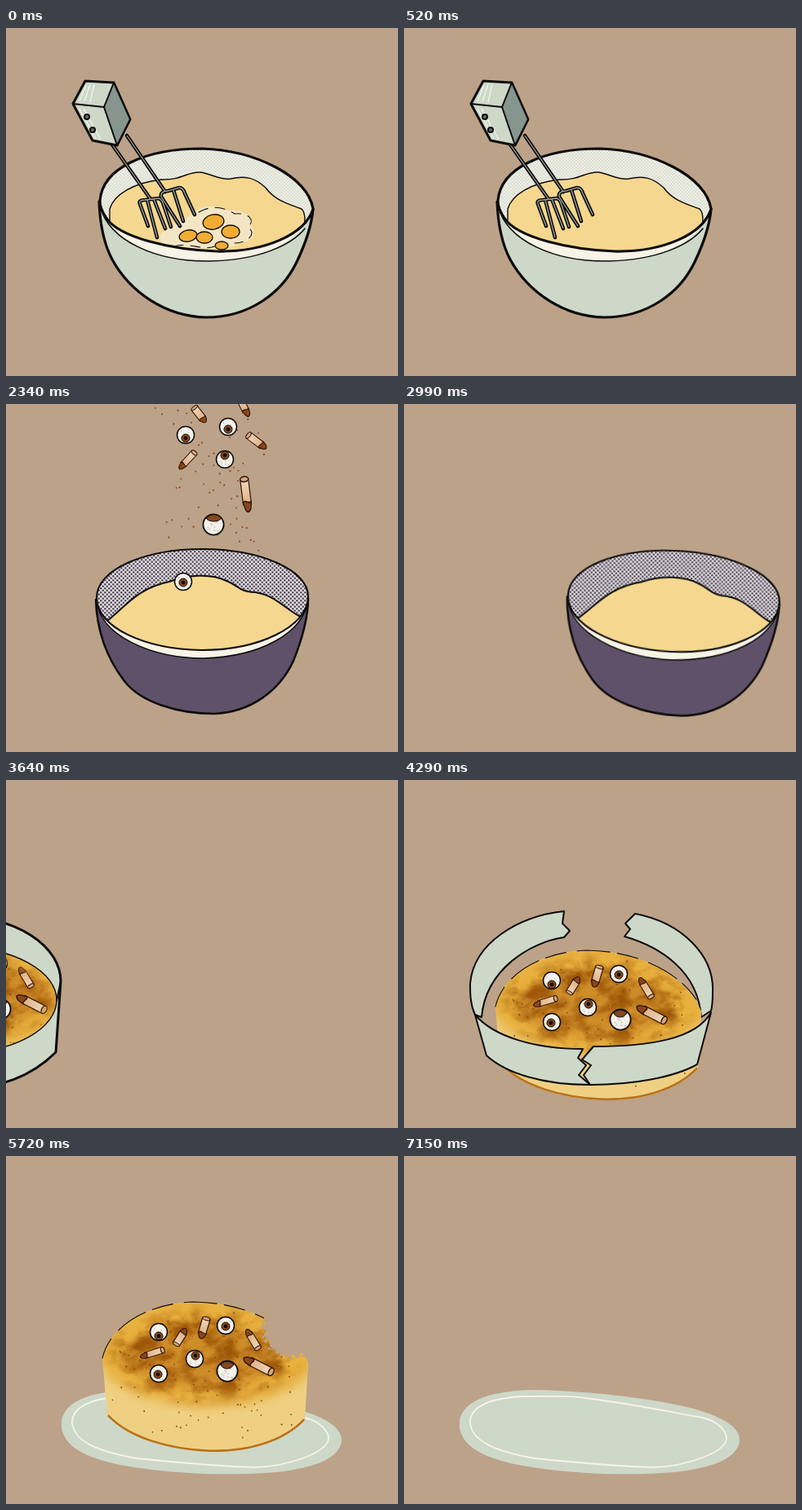
An HTML page without scripts that plays this animation: 480x427 px, repeating every 7410 ms.

```html
<!DOCTYPE html>
<html lang="en">
<head>
<meta charset="utf-8">
<title>Spooky cake</title>
<style>
html, body { margin: 0; height: 100%; overflow: hidden; background: #bca288; }
svg { display: block; width: 100vw; height: 100vh; }

/* The loop is 57 ticks of 130 ms; one tick is 1.7544 %. */
.mixing, .mixer, .eggs, .bowl, .stream, .batter, .toppings, .tin, .left, .right, .cake, .plate {
  animation: 7410ms step-end -2ms infinite;
}
.mixing { animation-name: mixing; }
.mixer { animation-name: mixer; transform-origin: 185px 235px; }
.eggs { animation-name: eggs; transform-origin: 245px 250px; }
.bowl { animation-name: bowl; transform-origin: 240px 280px; }
.stream { animation-name: stream; }
.batter { animation-name: batter; }
.toppings { animation-name: toppings; }
.tin { animation-name: tin; }
.left { animation-name: left; transform-origin: 225px 373px; }
.right { animation-name: right; transform-origin: 225px 373px; }
.cake { animation-name: cake; }
.plate { animation-name: plate; }
.bites circle { animation: bite 7410ms step-end calc(var(--tick) * 130ms - 7412ms) infinite; }

@keyframes mixing {
  0% { transform: none; }
  8.772% { transform: translateY(150px); }
  10.526% { transform: translateY(400px); }
}
@keyframes mixer {
  0% { transform: none; }
  1.754% { transform: translate(24px, -26px) rotate(4deg); }
  3.509% { transform: translate(58px, -8px) rotate(8deg); }
  5.263% { transform: translate(30px, 4px) rotate(3deg); }
  7.018% { transform: none; }
}
@keyframes eggs {
  0% { transform: none; animation-timing-function: steps(4); }
  7.018% { transform: rotate(120deg) scale(0); }
  100% { transform: rotate(120deg) scale(0); }
}
@keyframes bowl {
  0% { transform: translateY(270px); }
  10.526% { transform: translateY(270px); animation-timing-function: steps(2); }
  14.035% { transform: none; }
  38.596% { transform: none; animation-timing-function: steps(5); }
  47.368% { transform: translate(440px, 10px) rotate(12deg); }
  100% { transform: translate(440px, 10px) rotate(12deg); }
}
@keyframes stream {
  0% { transform: translateY(-320px); }
  12.281% { transform: translateY(-320px); animation-timing-function: steps(2); }
  15.789% { transform: none; animation-timing-function: steps(3); }
  21.053% { transform: translateY(90px); animation-timing-function: steps(2); }
  24.561% { transform: translateY(600px); }
  100% { transform: translateY(600px); }
}
@keyframes batter {
  0% { transform: translateY(100px); }
  15.789% { transform: translateY(100px); animation-timing-function: steps(5); }
  24.561% { transform: none; }
  100% { transform: none; }
}
@keyframes toppings {
  0% { transform: translateY(-280px); }
  24.561% { transform: translateY(-280px); animation-timing-function: steps(8); }
  38.596% { transform: translateY(280px); }
  100% { transform: translateY(280px); }
}
@keyframes tin {
  0% { transform: translate(-544px, -13px); }
  45.614% { transform: translate(-544px, -13px); animation-timing-function: steps(2); }
  49.123% { transform: translate(-272px, -13px); animation-timing-function: steps(2); }
  52.632% { transform: none; }
  54.386% { transform: translateY(-8px); }
  56.14% { transform: translateY(900px); }
}
@keyframes left {
  0% { transform: translateX(-900px); }
  56.14% { transform: rotate(6deg); }
  57.895% { transform: none; }
  59.649% { transform: translate(-90px, 12px) rotate(-10deg); }
  61.404% { transform: translate(-210px, 24px) rotate(-22deg); }
  63.158% { transform: translateX(-900px); }
}
@keyframes right {
  0% { transform: translateX(900px); }
  56.14% { transform: rotate(-6deg); }
  57.895% { transform: none; }
  59.649% { transform: translate(90px, 12px) rotate(10deg); }
  61.404% { transform: translate(210px, 24px) rotate(22deg); }
  63.158% { transform: translateX(900px); }
}
@keyframes cake {
  0% { transform: translateY(-900px); }
  56.14% { transform: translate(-6px, 30px); }
  64.912% { transform: translateY(-80px); }
  66.667% { transform: translateY(-160px); }
  68.421% { transform: translateY(-150px); }
  70.175% { transform: translateY(-70px); }
  71.93% { transform: none; }
  96.491% { transform: translateY(-900px); }
}
@keyframes plate {
  0% { transform: translateX(500px); }
  63.158% { transform: translateX(500px); animation-timing-function: steps(4); }
  70.175% { transform: none; }
  100% { transform: none; }
}
@keyframes bite {
  0% { opacity: 1; }
  35% { opacity: 0; }
}

.ink { stroke: #0d0b0a; stroke-linejoin: round; stroke-linecap: round; }
.line { fill: none; }
.mint { fill: #cdd8c9; }
.cream { fill: #f7f3e6; }
.dough { fill: #f5d78f; }
.yolk { fill: #f1ac33; stroke-width: 1.3; }
.specks { fill: none; stroke: #8a4a1c; stroke-width: 2; stroke-dasharray: 1.6 17 2 26 1.5 11; }
</style>
</head>
<body>
<svg viewBox="0 0 480 427" preserveAspectRatio="none">
<defs>
  <pattern id="mintDots" width="4" height="4" patternUnits="userSpaceOnUse">
    <path d="M0 0H4V4H0z" fill="#eeeee4"/>
    <g fill="#bcc9bc"><circle cx="1" cy="1" r=".7"/><circle cx="3" cy="3" r=".7"/></g>
  </pattern>
  <pattern id="plumDots" width="5" height="5" patternUnits="userSpaceOnUse">
    <path d="M0 0H5V5H0z" fill="#dfdad8"/>
    <g fill="#4c445c"><circle cx="1.25" cy="1.25" r="1.2"/><circle cx="3.75" cy="3.75" r="1.2"/></g>
  </pattern>
  <linearGradient id="skin">
    <stop stop-color="#f0d8bc"/><stop offset="1" stop-color="#e0ae84"/>
  </linearGradient>

  <filter id="soft" x="-20%" y="-30%" width="140%" height="160%"><feGaussianBlur stdDeviation="7"/></filter>
  <filter id="scorch" x="-20%" y="-30%" width="140%" height="160%" color-interpolation-filters="sRGB">
    <feTurbulence type="fractalNoise" baseFrequency=".035 .05" numOctaves="5" seed="4"/>
    <feColorMatrix values="0 0 0 0 .62  0 0 0 0 .34  0 0 0 0 .03  3 0 0 0 -1.1" result="spots"/>
    <feGaussianBlur in="SourceAlpha" stdDeviation="9"/>
    <feComposite in="spots" operator="in"/>
  </filter>
  <filter id="ragged" x="-20%" y="-20%" width="140%" height="140%">
    <feTurbulence type="fractalNoise" baseFrequency=".25" numOctaves="2" seed="7"/>
    <feDisplacementMap in="SourceGraphic" scale="18" xChannelSelector="R" yChannelSelector="G"/>
  </filter>

  <clipPath id="mintMouth"><path id="mintRim" d="M115 212C118 172 170 148 240 148C305 150 370 182 376 222C366 254 316 275 258 274C205 272 138 258 122 232C118 226 115 220 115 212z"/></clipPath>
  <clipPath id="plumMouth"><path id="plumRim" d="M111 238C111 202 172 178 240 178C312 178 370 204 370 236C370 274 308 302 240 302C170 301 111 274 111 238z"/></clipPath>
  <clipPath id="pourArea"><path d="M0-10H480V236H370C370 274 308 302 240 302C170 301 111 274 111 238H0z"/></clipPath>
  <clipPath id="aboveBatter"><path d="M0-10H480V238H0z"/></clipPath>
  <clipPath id="tinMouth"><ellipse cx="214" cy="283" rx="120" ry="65"/></clipPath>
  <clipPath id="cakeShape"><path d="M118 248C128 205 180 180 230 179C300 180 352 212 370 254L366 324C340 352 295 364 250 363C200 361 150 347 124 319z"/></clipPath>

  <g id="ball" class="ink" stroke-width="1.5">
    <circle r="10.5" fill="#f4f1ea"/>
    <path class="specks" d="M-6-5L5 7L-7 4L6-4" style="stroke:#c3b9ae;stroke-width:1;stroke-dasharray:1 4"/>
  </g>
  <g id="iris"><circle r="5" fill="#85481d" stroke="#1a0f08"/><circle r="2.4" fill="#120b07"/></g>
  <g id="finger" stroke="#2a160c" stroke-width="1.2">
    <path d="M-14-5H9V5H-14z" fill="url(#skin)"/>
    <ellipse cx="-14" rx="2.4" ry="5" fill="#d9a57c"/>
    <path d="M7-5C11-4 15-5 16 0C15 4 12 3 7 5C4 2 9-1 7-5z" fill="#8a451a"/>
  </g>

  <g id="cakeFace">
    <path d="M100 160H390V380H100z" fill="#efd083"/>
    <path d="M110 244C128 200 180 172 230 171C305 172 365 210 380 252C366 288 300 308 245 307C180 305 125 288 110 244z" fill="#e8b03c" filter="url(#soft)"/>
    <ellipse cx="240" cy="247" rx="94" ry="38" fill="#b56a12" opacity=".5" filter="url(#soft)"/>
    <ellipse cx="242" cy="244" rx="112" ry="52" filter="url(#scorch)"/>
    <path class="specks" d="M130 300L200 200L215 345L280 190L290 350L345 230L350 335L140 240L180 340L320 300" style="stroke:#7d4c14;stroke-width:1.6"/>
  </g>
  <g id="cakeItems">
    <use href="#ball" x="187" y="216"/><use href="#iris" x="187" y="221"/>
    <use href="#ball" x="269" y="208"/><use href="#iris" x="269" y="209"/>
    <use href="#ball" x="231" y="249"/><use href="#iris" x="232" y="245"/>
    <use href="#ball" x="187" y="267"/><use href="#iris" x="186" y="268"/>
    <use href="#ball" transform="translate(271 264) scale(1.2)"/>
    <path class="ink" d="M263 256Q271 248 279 256Q276 261 271 261Q265 261 263 256z" fill="#85481d"/>
    <use href="#finger" transform="translate(214 222) rotate(-58) scale(.75 .9)"/>
    <use href="#finger" transform="translate(242 211) rotate(106) scale(.85 .95)"/>
    <use href="#finger" transform="translate(302 225) rotate(-121) scale(.9 .85)"/>
    <use href="#finger" transform="translate(179 242) rotate(163) scale(.95 .75)"/>
    <use href="#finger" transform="translate(309 257) rotate(207) scale(1.25 1)"/>
  </g>
  <path id="whisk" d="M130 143L177 210M148 132L195 201M174 243L164 216Q162 211 170 211L187 209Q191 210 193 217L202 244M173 211L185 257M181 210L195 246M213 243L190 207Q189 200 198 200L212 196Q217 196 219 203L231 229M205 199L217 237"/>

  <mask id="eaten" maskUnits="userSpaceOnUse" x="0" y="0" width="480" height="427">
    <path d="M0 0H480V427H0z" fill="#fff"/>
    <g class="bites" filter="url(#ragged)">
      <circle cx="351" cy="211" r="36" style="--tick:44"/>
      <circle cx="308" cy="205" r="38" style="--tick:45"/>
      <circle cx="345" cy="262" r="42" style="--tick:46"/>
      <circle cx="292" cy="258" r="44" style="--tick:47"/>
      <circle cx="250" cy="208" r="44" style="--tick:48"/>
      <circle cx="240" cy="266" r="46" style="--tick:49"/>
      <circle cx="345" cy="322" r="50" style="--tick:50"/>
      <circle cx="285" cy="335" r="50" style="--tick:51"/>
      <circle cx="180" cy="212" r="46" style="--tick:52"/>
      <circle cx="220" cy="335" r="52" style="--tick:53"/>
      <circle cx="150" cy="262" r="48" style="--tick:54"/>
    </g>
  </mask>
</defs>

<path d="M0 0H480V427H0z" fill="#bca288"/>

<g class="plate">
  <path class="mint" d="M68 332C66 305 95 288 160 287C230 288 330 300 370 315C400 325 412 338 411 350C408 370 380 383 330 388C270 393 200 390 140 379C95 370 70 355 68 332z"/>
  <path class="line" stroke="#f8f4e6" stroke-width="1.8" d="M81 328C80 308 105 296 150 295C200 295 200 294 230 298C290 306 330 315 365 321C385 325 395 338 395 347C393 364 345 381 305 382C260 381 210 376 160 371C110 362 84 350 81 328z"/>
</g>

<g class="mixing">
  <path class="ink mint" stroke-width="3.2" d="M114 213C115 240 120 265 130 284C152 324 195 354 245 355C298 355 338 325 356 287C366 266 374 245 376 222z"/>
  <path class="cream" d="M115 208C115 250 170 287 250 286C310 286 365 262 376 222z"/>
  <path class="ink line" stroke-width="1.5" d="M115 218C126 262 185 287 250 286C310 285 350 266 366 246"/>
  <g clip-path="url(#mintMouth)">
    <path d="M100 140H390V290H100z" fill="url(#mintDots)"/>
    <path class="ink dough" stroke-width="1.4" d="M127 300V222C132 205 155 190 190 186C215 187 222 176 238 177C252 179 262 187 275 185C292 181 304 183 318 196C330 213 350 217 362 222C367 227 367 236 364 250V300z"/>
  </g>
  <g class="eggs">
    <path fill="#f4e6c4" d="M190 262C180 250 215 240 225 230C240 215 262 217 272 224C290 222 306 232 300 242C310 256 296 264 284 264C270 276 240 270 228 270C212 272 192 272 190 262z"/>
    <path class="ink line" stroke-width="1.1" stroke-dasharray="12 9" d="M205 268C225 262 240 274 255 268M236 226C255 215 270 222 280 228C300 226 305 238 296 244C308 252 296 264 280 264"/>
    <g class="ink yolk">
      <ellipse cx="254" cy="238" rx="13" ry="9" transform="rotate(-12 254 238)"/>
      <ellipse cx="275" cy="250" rx="11" ry="8"/>
      <ellipse cx="223" cy="255" rx="11" ry="7" transform="rotate(-12 223 255)"/>
      <ellipse cx="243" cy="257" rx="10" ry="7"/>
      <ellipse cx="264" cy="267" rx="8" ry="5"/>
    </g>
  </g>
  <use href="#mintRim" class="ink line" stroke-width="3.2"/>
  <g class="mixer">
    <use href="#whisk" class="ink line" stroke-width="4.6"/>
    <use href="#whisk" class="line" stroke="#9ba69f" stroke-width="1.3"/>
    <path class="ink mint" stroke-width="3" d="M97 65L132 67L152 112L136 144L106 138L82 93z"/>
    <path class="ink" stroke-width="2" fill="#87958f" d="M132 67L152 112L136 144L120 97z"/>
    <path class="ink line" stroke-width="2" d="M82 93L120 97"/>
    <path class="line" stroke="#f4f4ea" stroke-width="1.3" d="M98 70L90 90M103 69L96 90M108 69L103 91M90 99L110 136M95 99L116 137"/>
    <g class="ink" fill="#65706b" stroke-width="2"><circle cx="99" cy="109" r="3"/><circle cx="106" cy="125" r="3"/></g>
  </g>
</g>

<g class="bowl">
  <path class="ink" fill="#5e5169" stroke-width="2.5" d="M110 240C111 275 122 310 145 340C165 366 210 380 255 380C300 378 335 352 352 315C362 290 370 265 370 238z"/>
  <path class="ink cream" stroke-width="1.6" d="M111 240C114 285 180 312 242 312C310 310 366 282 370 238z"/>
  <use href="#plumRim" fill="url(#plumDots)"/>
  <g clip-path="url(#pourArea)">
    <path class="stream ink dough" stroke-width="2.5" d="M182 0C182 40 206 50 203 95C201 120 222 130 220 178C215 200 198 220 199 245C202 270 228 290 247 291C262 290 276 265 274 247C270 220 260 205 261 178C262 150 269 120 267 78C275 55 300 35 303 0C305-90 270-180 245-250C215-180 186-90 182 0z"/>
  </g>
  <g clip-path="url(#plumMouth)">
    <path class="batter ink dough" stroke-width="2" d="M124 266C145 250 160 226 200 218C220 210 250 207 270 217C285 223 285 230 305 231C328 234 340 250 362 262V420H124z"/>
  </g>
  <use href="#plumRim" class="ink line" stroke-width="2.2"/>
</g>

<g clip-path="url(#aboveBatter)">
  <g class="toppings">
    <path class="specks" d="M230 10L182 5L236 50L205 110L300 15L320 60L240 95L290 170L196 140L200 168L285 70L282 140L312 185L215 0"/>
    <use href="#ball" x="220" y="38"/><use href="#iris" x="220" y="42"/>
    <use href="#ball" x="272" y="28"/><use href="#iris" x="272" y="31"/>
    <use href="#ball" x="268" y="68"/><use href="#iris" x="268" y="63"/>
    <use href="#ball" x="217" y="218"/><use href="#iris" x="217" y="219"/>
    <use href="#ball" transform="translate(254 148) scale(1.2)"/>
    <path class="ink" d="M245 140Q254 131 264 140Q260 145 254 144Q248 144 245 140z" fill="#85481d"/>
    <use href="#finger" transform="translate(237 13) rotate(52) scale(.75 .9)"/>
    <use href="#finger" transform="translate(290 1) rotate(64) scale(1 .85)"/>
    <use href="#finger" transform="translate(307 46) rotate(37) scale(.9)"/>
    <use href="#finger" transform="translate(222 69) rotate(133) scale(.9 .8)"/>
    <use href="#finger" transform="translate(294 111) rotate(83) scale(1.35 1)"/>
  </g>
</g>

<g class="tin">
  <path class="ink mint" stroke-width="3" d="M89 260A125 80 0 0 1 339 260L333 347C300 380 260 392 214 392C165 392 125 380 95 347z"/>
  <g clip-path="url(#tinMouth)">
    <path d="M80 200H350V360H80z" fill="#e8b03c"/>
    <g transform="translate(-6 30)"><use href="#cakeFace"/><use href="#cakeItems"/></g>
    <ellipse cx="214" cy="283" rx="120" ry="65" fill="none" stroke="#ecb544" stroke-width="14" opacity=".7" filter="url(#soft)"/>
  </g>
  <ellipse class="ink line" cx="214" cy="283" rx="120" ry="65" stroke-width="1.4"/>
  <path class="ink line" stroke-width="2" d="M339 260L334 284M89 260L94 284"/>
</g>

<g class="ink mint" stroke-width="2">
  <path class="left" d="M196 161L194 176L203 185L196 193C155 199 100 232 95 291L87 288C81 275 81 262 81 250C85 200 140 167 196 161z"/>
  <path class="right" d="M283 164L271 176L277 183L270 192C315 205 360 235 364 291L376 283C378 275 378 268 378 260C380 215 340 175 283 164z"/>
</g>

<g class="cake">
  <g mask="url(#eaten)">
    <g clip-path="url(#cakeShape)">
      <use href="#cakeFace"/>
      <path class="line" stroke="#b8701a" stroke-width="5" d="M124 319C150 347 200 361 250 363C295 364 340 352 366 324"/>
    </g>
    <path class="ink line" stroke-width="1.1" stroke-dasharray="26 14 40 9" d="M118 248C128 205 180 180 230 179C300 180 352 212 370 250"/>
    <use href="#cakeItems"/>
  </g>
</g>

<g class="ink mint" stroke-width="2">
  <path class="left" d="M87 288C110 315 160 330 219 330L213 341L223 350L214 362L228 374C170 374 125 360 101 338z"/>
  <path class="right" d="M376 285C358 318 300 327 232 327L218 343L229 350L220 362L228 374C280 374 330 365 359 349z"/>
</g>
</svg>
</body>
</html>
```
